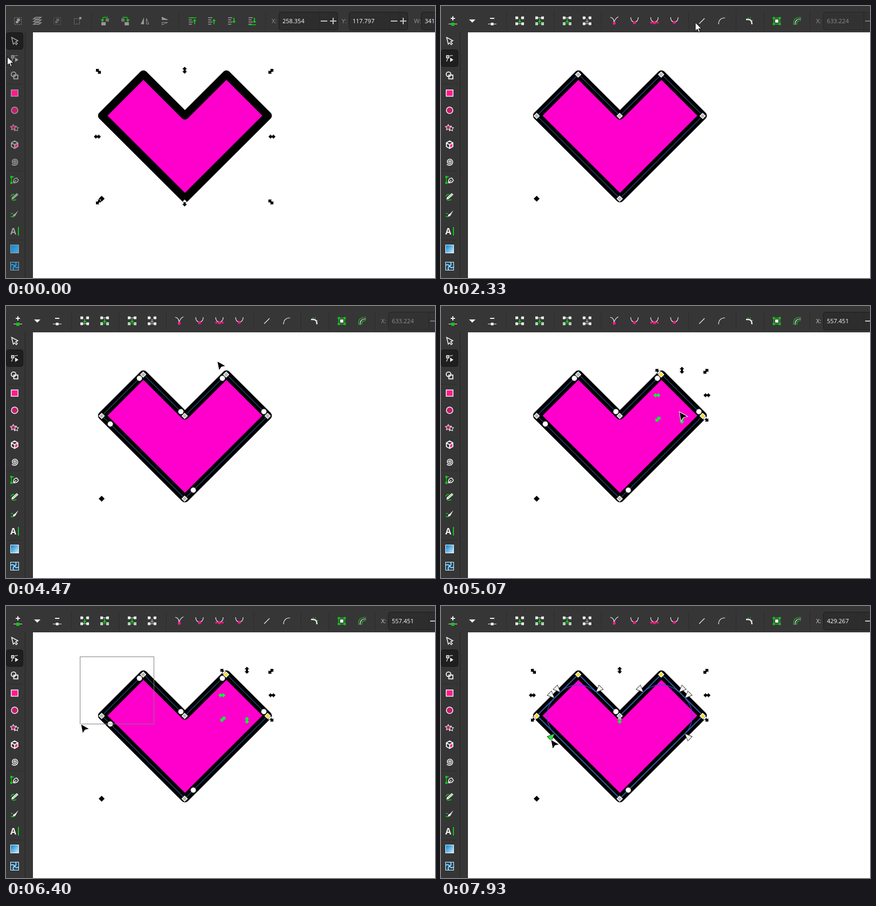
Animation of 796 by 506 pixels, one loop 8 s. Source, as an HTML page with a canvas:

```html
<!DOCTYPE html>
<html lang="en">
<head>
<meta charset="utf-8">
<title>Rounding corners of a path</title>
<style>
html, body { margin: 0; width: 100%; height: 100%; overflow: hidden; background: #fff; }
canvas { display: block; }
</style>
</head>
<body>
<canvas id="stage" width="796" height="506"></canvas>
<script>
const g = document.getElementById('stage').getContext('2d');
const LOOP = 8000, STEP = 200 / 3;
const GREEN = '#12c41b', PINK = '#ff1a8c', BAR = '#363636';

// ---- timing ----
const SWITCH = 1270, PRESS = 3200, ROUND = 3330, LEAVE = 3720;
const PICK1 = 4870, PICK2 = 6500, HOVER = 6860, TIP = 6920, PULL = 7260;
const bands = [[4480, PICK1, 391, 102], [6060, PICK2, 275, 94]];
const route = [
  [0, 2, 94], [400, 17, 98], [700, 17, 98], [800, 16, 97], [1100, 16, 97], [1130, 16, 99],
  [1400, 16, 99], [2070, 403, 37], [2330, 470, 30], [2530, 555, 34], [2600, 557, 34],
  [3000, 573, 30], [3690, 573, 30], [4000, 456, 101], [4330, 391, 102], [4470, 391, 102],
  [4800, 500, 216], [4930, 500, 216], [5060, 450, 196], [5270, 166, 193], [5330, 158, 195],
  [5930, 275, 94], [6040, 275, 94], [6400, 138, 219], [6500, 138, 219], [6870, 194, 219],
  [PULL, 194, 219], [7930, 203, 248]
];

// ---- path nodes: x, y, handle offset, inward direction ----
const nodes = [
  { x: 177.5, y: 204.5, h: [16, 15], c: [1, 0] },
  { x: 254.5, y: 127.5, h: [-7, 7], c: [0, 1] },
  { x: 331.5, y: 204.5, h: [-7, -8] },
  { x: 408.5, y: 127.5, h: [-7, 7], c: [0, 1] },
  { x: 485.5, y: 204.5, h: [-7, -8], c: [-1, 0] },
  { x: 331.5, y: 358.5, h: [16, -16] }
];
// Node marks snap to pixels, the outline lies half a pixel off
const heart = new Path2D('M' + nodes.map(n => `${n.x + .5} ${n.y - .5}`).join('L') + 'Z');

// ---- drawing helpers ----
function at(x, y, fn) {
  g.save();
  g.translate(x, y);
  fn();
  g.restore();
}
function fill(x, y, d, color) {
  at(x, y, () => { g.fillStyle = color; g.fill(new Path2D(d)); });
}
function line(x, y, d, color, w = 1.4) {
  at(x, y, () => { g.strokeStyle = color; g.lineWidth = w; g.stroke(new Path2D(d)); });
}
function rect(x, y, w, h, color) {
  g.fillStyle = color;
  g.fillRect(x, y, w, h);
}
function square(x, y, s, color) { rect(x - s / 2, y - s / 2, s, s, color); }
function frame(x, y, w, h, color, lw = 1) {
  g.strokeStyle = color;
  g.lineWidth = lw;
  g.strokeRect(x, y, w, h);
}
function disc(x, y, r, color, edge, w = 1) {
  g.beginPath();
  g.arc(x, y, r, 0, 7);
  if (color) { g.fillStyle = color; g.fill(); }
  if (edge) { g.strokeStyle = edge; g.lineWidth = w; g.stroke(); }
}
function tile(x, y, w, h, color, edge) {
  g.beginPath();
  g.roundRect(x + .5, y + .5, w - 1, h - 1, 4);
  g.fillStyle = color;
  g.fill();
  g.strokeStyle = edge;
  g.lineWidth = 1;
  g.stroke();
}
function text(s, x, y, color, font = '11px "Open Sans", sans-serif', gap = 0) {
  g.font = font;
  g.letterSpacing = gap + 'px';
  g.fillStyle = color;
  g.fillText(s, x, y);
}
function separators(...xs) { xs.forEach(x => rect(x, 11, 1, 34, '#2c2c2c')); }
function entry(label, value, x, lit, labelColor = '#929292') {
  text(label, x - 13, 32, labelColor);
  tile(x, 11, 110, 34, lit ? '#2d2d2d' : '#323232', lit ? '#1d1d1d' : '#262626');
  text(value, x + 7, 32, lit ? '#fff' : '#8f8f8f');
  rect(x + 75, 12, 1, 32, '#282828');
  rect(x + 94, 12, 1, 32, '#282828');
  const c = lit ? '#c4c4c4' : '#777';
  rect(x + 78, 27, 12, 2, c);
  rect(x + 95, 27, 12, 2, c);
  rect(x + 100, 22, 2, 12, c);
}

// ---- toolbars ----
function selectBar() {
  const c = '#979797', dim = '#626262';
  for (const x of [22, 95, 133]) {
    const small = x === 133, shade = x === 95 ? dim : c, s = small ? 10 : 13;
    g.setLineDash([2, 2]);
    frame(x - 6.5, small ? 23.5 : 21.5, s, s, shade);
    g.setLineDash([]);
    if (small) { square(138, 22.5, 4, c); continue; }
    disc(x + 1, 26, 3, shade);
    rect(x - 4, 28, 5, 4, shade);
  }
  for (const y of [22, 27, 32]) line(58, y, 'M-7 2L-3 -1H7L3 2Z', c, 1.5);
  for (const s of [1, -1]) at(202.5 - s * 18.5, 28, () => {
    g.scale(s, 1);
    rect(-7, 2, 8, 6, c);
    rect(1, -5, 6, 6, '#747474');
    line(0, 0, 'M5 -7H-2Q-5 -7 -5 -2', GREEN, 1.5);
    fill(-5, 0, 'M-3.5 -3H3.5L0 2Z', GREEN);
  });
  for (const [x, a] of [[258, 0], [295, Math.PI / 2]]) at(x, 28, () => {
    g.rotate(a);
    fill(0, 0, 'M-2 -7V6H-8Z', c);
    line(0, 0, 'M2.5 -5V5.5H7Z', c, 1);
  });
  [346, 382, 419, 457].forEach((x, i) => {
    const up = i < 2, top = i % 3 === 0;
    for (let k = 0; k < 4; k++) rect(x - 7, 21 + k * 4, k % 2 ? 6 : 8, 1.5, c);
    if (top) rect(x - 7, up ? 21 : 34, 14, 1.5, GREEN);
    at(x + 4, 28, () => {
      g.scale(1, up ? 1 : -1);
      fill(0, 0, 'M-3.5 0L0 -4 3.5 0H1V6H-1V0Z', GREEN);
    });
  });
  separators(158, 320, 481);
  entry('X:', '258.354', 506, true);
  entry('Y:', '117.797', 636, true);
  entry('W:', '341', 770, true);
}

function joinIcon(x, mark, cut) {
  const c = '#eee';
  for (const y of [22, 33]) {
    square(x - 5.5, y, 5, c);
    square(x + 5.5, y, 5, c);
  }
  rect(x - 8, 21.5, cut ? 6 : 16, 1, c);
  rect(x + 2, 21.5, 6, 1, c);
  rect(x - 8, 32.5, 16, 1, cut ? c : mark);
  fill(x, 28, 'M-1 -4H1V0H3.5L0 4 -3.5 0H-1Z', mark);
}

function nodeBar(value, lit, pressed) {
  const c = '#eee';
  rect(18, 22, 8, 2, c);
  rect(21, 19, 2, 8, c);
  rect(14, 33, 16, 1, c);
  square(22, 34, 6, GREEN);
  fill(58, 28, 'M-6 -3H6L0 3Z', c);
  rect(91, 22, 8, 2, c);
  rect(87, 33, 16, 1, c);
  square(95, 33.5, 5, c);
  joinIcon(146, GREEN, true);
  joinIcon(183, GREEN, false);
  joinIcon(234, GREEN, false);
  joinIcon(271, '#8c8c8c', true);
  line(322, 28, 'M-8 -7Q-1 -6 -1 3Q1 -5 7 -8', c, 1.2);
  disc(321.5, 32, 2.7, PINK);
  for (const x of [359, 396, 433]) line(x, 28, 'M-7 -7C-7 5 7 5 7 -7', c, 1.2);
  square(359, 31, 5, PINK);
  rect(389, 30.5, 14, 1, PINK);
  square(396, 31, 5, PINK);
  disc(390, 31, 1.8, PINK);
  disc(402, 31, 1.8, PINK);
  disc(433, 30.5, 2.7, PINK);
  line(484, 28, 'M-5 5L5 -5', c, 1.2);
  line(521, 28, 'M-6 6C-6 -3 0 -6 6 -6', c, 1.2);
  if (pressed) tile(554, 11, 36, 34, '#2a2a2a', '#1a1a1a');
  line(572, 28, 'M-6 -3H-2C3 -3 5 0 5 6', c, 2.4);
  line(572, 28, 'M-3 -6H-1M1 -6H3M6 -2V0', GREEN, 1.5);
  frame(617.5, 22.5, 11, 11, GREEN, 1.5);
  for (const x of [617.5, 628.5]) for (const y of [22.5, 33.5]) square(x, y, 4, GREEN);
  square(623, 28, 6, c);
  line(661, 28, 'M-7 7C-7 -4 -4 -7 7 -7M-1 7C-1 1 1 -1 7 -1', GREEN, 1.2);
  line(661, 28, 'M-4 7C-4 -1 -1 -4 7 -4', c, 1.2);
  separators(121, 209, 297, 459, 547, 599, 684);
  entry('X:', value, 709, lit, lit ? '#d0d0d0' : undefined);
}

function star(x, y, r, color, edge) {
  g.beginPath();
  for (let i = 0; i < 10; i++) {
    const a = i * Math.PI / 5 - Math.PI / 2, q = i % 2 ? r * .55 : r;
    g.lineTo(x + q * Math.cos(a), y + q * Math.sin(a));
  }
  g.closePath();
  g.fillStyle = color;
  g.fill();
  g.strokeStyle = edge;
  g.lineWidth = 1.1;
  g.stroke();
}

function toolbox(active) {
  const c = active ? '#f2f2f2' : '#a2a2a2', rose = '#c41d6c';
  tile(0, active ? 81 : 49, 32, 32, '#1f1f1f', '#161616');
  line(16, 65, 'M-5.5 -6.5L6 -.5 2 1.5 5 5 3 7 0 3.5 -2.5 6Z', c, 1.5);
  frame(10.5, 92.5, 4, 4, c, 1.8);
  line(16, 97, 'M0 -4Q3 -5 6 -5M-4 1Q-4 4 -6 6', c, 1.2);
  fill(17, 97, 'M0 -1L6 3 0 7Z', c);
  disc(14, 127, 4.3, null, c, 1.8);
  frame(14.5, 128.5, 7.5, 7, c, 1.8);
  rect(10, 156.5, 12, 11, PINK);
  frame(9.7, 156.2, 12.6, 11.6, c, 1.5);
  disc(16, 194, 6, rose, c, 1.5);
  star(18.5, 228, 5, BAR, c);
  star(13.5, 226, 5.5, rose, c);
  fill(16, 258, 'M0 0L6 -3.5V3.5L0 7Z', PINK);
  line(16, 258, 'M0 -7L6 -3.5V3.5L0 7 -6 3.5V-3.5ZM-6 -3.5L0 0 6 -3.5M0 0V7', c, 1.8);
  g.beginPath();
  for (let a = 0; a < 15; a += .2) g.lineTo(16 + a * .45 * Math.cos(a), 290 + a * .45 * Math.sin(a));
  g.strokeStyle = c;
  g.lineWidth = 1.6;
  g.stroke();
  line(16, 323, 'M-6 5V-2Q-6 -6 -1 -5', GREEN, 1.4);
  square(10, 329, 4, GREEN);
  square(10, 318, 4, GREEN);
  line(16, 323, 'M-2 6C-3 0 0 -3 4 -3L7 1C6 5 2 6 -2 6ZM-2 6L3 1', c, 1.4);
  line(16, 355, 'M-7 -1Q-4 -6 -1 -4M-5 6Q0 7 3 5', GREEN, 1.6);
  fill(16, 355, 'M-6 5L-5 1 4 -7 7 -4 -2 4Z', c);
  line(16, 355, 'M-3 2L5 -5', GREEN, 1);
  line(16, 387, 'M-7 4Q-3 7 0 3M-7 -1L-3 -1', GREEN, 1.7);
  fill(16, 387, 'M-3 4Q-3 0 0 0L7 -7 2 2Q1 5 -3 4Z', c);
  text('A', 8, 425, c, 'bold 16px "Open Sans", sans-serif');
  rect(22, 411, 2, 16, GREEN);
  const blue = g.createLinearGradient(9, 446, 23, 459);
  blue.addColorStop(0, '#0c86d6');
  blue.addColorStop(1, active ? '#c9ecff' : '#58a7d8');
  for (const y of [452, 484]) {
    rect(9, y - 7, 14, 14, y > 460 ? '#174f73' : blue);
    frame(8.5, y - 7.5, 15, 15, c, 1);
  }
  line(16, 484, 'M-7 -2Q-2 -4 0 0Q2 4 7 2M2 -7Q4 -2 0 0Q-4 2 -2 7', active ? '#bfe8ff' : '#4aa5dc', 1.5);
  for (const y of [145, 306, 435]) rect(0, y, 32, 1, '#2c2c2c');
}

// ---- canvas overlays ----
function diamond(x, y, r) {
  g.beginPath();
  g.moveTo(x - r, y);
  g.lineTo(x, y - r);
  g.lineTo(x + r, y);
  g.lineTo(x, y + r);
  g.closePath();
}
function inverted(fn) {
  g.save();
  g.globalCompositeOperation = 'difference';
  fn();
  g.restore();
}
function arrow(x, y, angle) {
  at(x, y, () => {
    g.rotate(angle * Math.PI / 4);
    fill(0, 0, 'M-6.5 0L-2 -4.5V-2H2V-4.5L6.5 0 2 4.5V2H-2V4.5Z', '#fff');
  });
}
function transformBox(x0, y0, x1, y1) {
  const mx = (x0 + x1) / 2, my = (y0 + y1) / 2;
  inverted(() => {
    arrow(x0 - 6, y0 - 6, 1);
    arrow(x1 + 6, y1 + 6, 1);
    arrow(x1 + 6, y0 - 6, 3);
    arrow(x0 - 6, y1 + 6, 3);
    arrow(mx, y0 - 8, 2);
    arrow(mx, y1 + 8, 2);
    arrow(x0 - 8, my, 0);
    arrow(x1 + 8, my, 0);
  });
}
function drawNode(n, selected) {
  diamond(n.x, n.y, 6.5);
  g.fillStyle = '#222';
  g.fill();
  diamond(n.x, n.y, 5.8);
  g.fillStyle = '#fff';
  g.fill();
  diamond(n.x, n.y, 4);
  g.fillStyle = selected ? '#f5df1f' : '#b9b9b9';
  g.fill();
}
// Rounded-corner preview with a pair of pointers at its ends
function corner(n, d) {
  const [cx, cy] = n.c, a = Math.atan2(-cy, -cx);
  g.beginPath();
  g.arc(n.x + 2 * d * cx, n.y + 2 * d * cy, d * Math.SQRT2, a - Math.PI / 4, a + Math.PI / 4);
  g.strokeStyle = '#3a50d0';
  g.lineWidth = 1.2;
  g.stroke();
}
function pointers(n, d) {
  const [cx, cy] = n.c;
  for (const s of [-1, 1]) {
    const ex = cx - s * cy, ey = cy + s * cx;
    at(n.x + d * ex, n.y + d * ey, () => {
      g.rotate(Math.atan2(ey - 2 * cy, ex - 2 * cx));
      const held = n === nodes[0] && s > 0, d3 = 'M1 0L13 -5V5Z';
      line(0, 0, d3, '#333', 1.8);
      fill(0, 0, d3, held ? '#33e63c' : '#f4f4f4');
    });
  }
}
function pointer(x, y, overCanvas) {
  const d = overCanvas ? 'M1.5 1.5L15.5 9.5 8.5 11 4.5 17Z'
    : 'M.5 .5V16.5L4.2 13 6.7 18.7 9.1 17.6 6.7 12.1H12Z';
  if (overCanvas) line(x, y, d, '#fff', 1.8);
  fill(x, y, d, overCanvas ? '#000' : '#fff');
  if (!overCanvas) line(x, y, d, '#000', 1);
}
function pointerAt(t) {
  const i = route.findIndex(k => k[0] > t);
  if (i < 0) return route[route.length - 1].slice(1);
  const [t0, x0, y0] = route[i - 1], [t1, x1, y1] = route[i], p = (t - t0) / (t1 - t0);
  return [x0 + (x1 - x0) * p, y0 + (y1 - y0) * p];
}

function draw(t) {
  const editing = t >= SWITCH, [x, y] = pointerAt(t);
  const chosen = n => n.c && (t >= PICK2 || t >= PICK1 && n.x > 400);
  const pulling = t >= PULL;
  const depth = 16 + 17 * Math.min(1, (t - PULL) / (7930 - PULL));

  rect(0, 0, 796, 506, '#fff');
  g.lineJoin = 'round';
  g.fillStyle = '#ff00cc';
  g.fill(heart);
  g.strokeStyle = '#000';
  g.lineWidth = 14.6;
  g.stroke(heart);
  g.lineJoin = 'miter';

  inverted(() => {
    diamond(177.5, 358.5, 5.5);
    g.fillStyle = '#fff';
    g.fill();
  });
  if (!editing) transformBox(177.5, 127.5, 485.5, 358.5);
  else {
    g.strokeStyle = '#3f78d0';
    g.lineWidth = t >= HOVER ? 1.5 : 1;
    g.stroke(heart);
    if (t >= PICK1) transformBox(t >= PICK2 ? 177.5 : 408.5, 127.5, 485.5, 204.5);
    if (pulling) nodes.forEach(n => n.c && corner(n, depth));
    nodes.forEach(n => drawNode(n, chosen(n)));
    if (t >= ROUND) nodes.forEach((n, i) => {
      if (pulling && n.c) pointers(n, depth);
      else disc(n.x + n.h[0], n.y + n.h[1], 5, t >= HOVER && !i ? '#33e63c' : '#fff', '#444', .8);
    });
  }
  for (const [from, to, bx, by] of bands) {
    if (t >= from && t < to) frame(bx - .5, by + .5, Math.round(x - bx), Math.round(y - by), '#808080');
  }
  if (t >= TIP && !pulling) {
    rect(192, 199, 73, 16, 'rgba(51,51,128,.4)');
    text('Handle to path', 196, 210, '#fff', '8px "Liberation Sans", sans-serif', .85);
  }

  rect(0, 0, 796, 49, BAR);
  rect(0, 49, 50, 457, BAR);
  rect(35, 49, 1, 457, '#262626');
  toolbox(editing);
  if (editing) {
    const value = t >= PICK2 ? '429.267' : t >= PICK1 ? '557.451' : '633.224';
    nodeBar(value, t >= PICK1, t >= PRESS && t < LEAVE);
  } else selectBar();
  pointer(x, y, x > 50 && y > 49);
}

function tick(now) {
  const t = now % LOOP;
  draw(Math.floor((t + 5) / STEP) * STEP % LOOP);
  requestAnimationFrame(tick);
}
requestAnimationFrame(tick);
</script>
</body>
</html>
```
